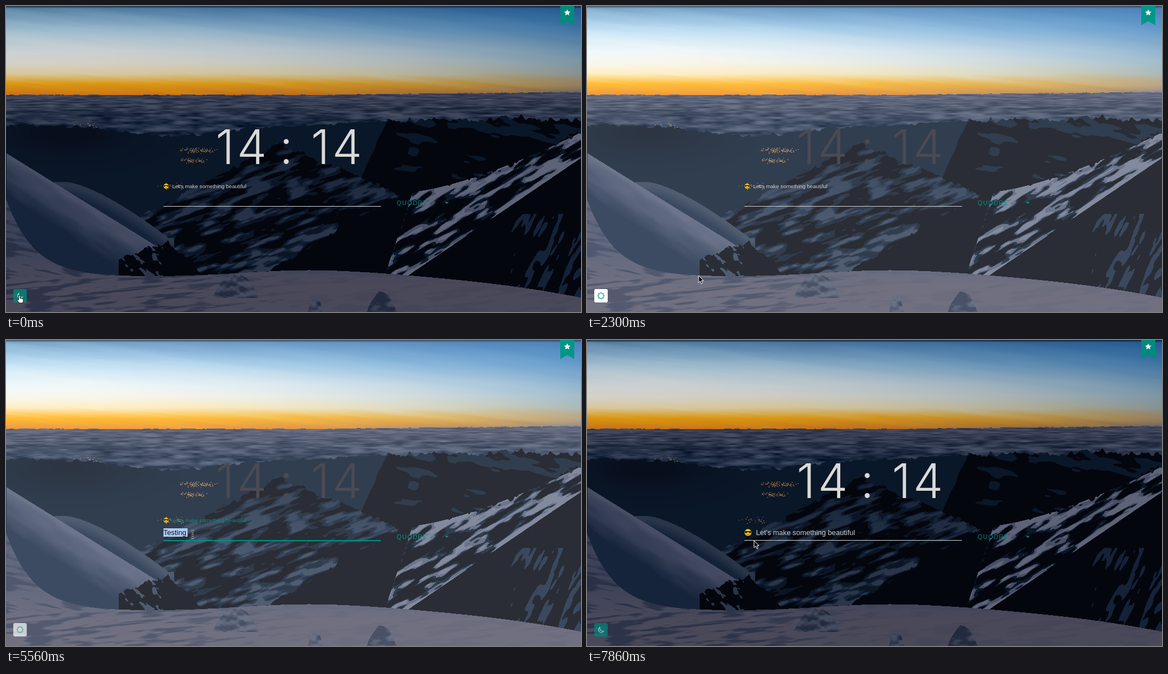
Write an HTML page with a canvas that moves like this. It is 1026 px wide and 546 px high and loops after 8 s.

```html
<!DOCTYPE html>
<html lang="en">
<head>
<meta charset="utf-8">
<title>Start page</title>
<style>
html, body { margin: 0; width: 100%; height: 100%; overflow: hidden; background: #04060e; }
canvas { display: block; }
</style>
</head>
<body>
<canvas id="stage" width="1026" height="546"></canvas>
<script>
const W = 1026, H = 546, LOOP = 8000, HORIZON = 158;
const DAY = 780, NIGHT = 7350, TYPE_END = 4660, CLEAR = 5860;
const stage = document.getElementById('stage').getContext('2d');
const SANS = '"Liberation Sans", Arial, sans-serif';

const clamp = v => Math.min(1, Math.max(0, v));
const ramp = (v, from, to) => clamp((v - from) / (to - from));
const rgb = hex => [1, 3, 5].map(i => parseInt(hex.substr(i, 2), 16));
const mix = (a, b, k) => a.map((v, i) => v + (b[i] - v) * k);
const css = color => `rgb(${color.map(Math.round)})`;
const TEAL = rgb('#009285'), WHITE = rgb('#ffffff'), PALE = rgb('#d0d1d4');

// ---------- landscape: layers of ridge lines with noise textures ----------

function hash(x, y) {
  const s = Math.sin(x * 127.1 + y * 311.7) * 43758.5453;
  return s - Math.floor(s);
}

function noise(x, y) {
  const ix = Math.floor(x), iy = Math.floor(y);
  const fx = (x - ix) ** 2 * (3 - 2 * (x - ix)), fy = (y - iy) ** 2 * (3 - 2 * (y - iy));
  const row = j => hash(ix, j) + (hash(ix + 1, j) - hash(ix, j)) * fx;
  return row(iy) + (row(iy + 1) - row(iy)) * fy;
}

const fbm = (x, y) => (noise(x, y) * 2 + noise(x * 2.3 + 9, y * 2.3)) / 3;
const jag = (x, size) => (fbm(x / 9, 3) - .5) * size;
const bump = (x, center, width) => Math.exp(-(((x - center) / width) ** 2));
const within = (x, from, to, y) => x > from && x < to ? y : Infinity;

// Noise stretched along a direction.
function streak(x, y, angle, length, width) {
  const c = Math.cos(angle), s = Math.sin(angle);
  return fbm((x * c + y * s) / length, (y * c - x * s) / width);
}

const SKY_LEFT = ['#567f9f', '#7a9fbb', '#9dbacd', '#b8c9d1', '#cbd1d2', '#d3d0c6', '#d8c79c', '#da960f', '#c8701a'].map(rgb);
const SKY_RIGHT = ['#23588f', '#2f669b', '#3d73a3', '#537fa4', '#6a8ea8', '#7b95a4', '#87918f', '#95805f', '#5f5a62'].map(rgb);
const BLACK = rgb('#04060e'), NAVY = rgb('#0a1728'), BLUE = rgb('#142238'), SLATE = rgb('#2a3549'),
  SNOW = rgb('#474e64'), BRIGHT = rgb('#5e6377'), DUSK = rgb('#4a495a');

function sky(x, y) {
  const v = clamp((y + (streak(x, y, .12, 180, 9) - .5) * 9) / 160) * 7.999;
  const i = Math.floor(v), tone = stops => mix(stops[i], stops[i + 1], v - i);
  const color = mix(tone(SKY_LEFT), tone(SKY_RIGHT), (x / W) ** (1 + y / 80));
  return mix(color, BLACK, .6 * (1 - ramp(y, 0, 4)));
}

function clouds(x, y) {
  const base = mix(rgb('#3b4156'), rgb('#1d2a40'), ramp(y, HORIZON, 222));
  return mix(base, rgb('#6d7488'), (streak(x, y, 0, 26, 3 + (y - HORIZON) / 12) - .5) * 1.1);
}

function middleMountain(x, y) {
  const n = streak(x, y, -.35, 34, 8);
  return n < .46 ? BLACK : n < .6 ? rgb('#0b1525') : n < .68 ? BLUE : mix(BLUE, SLATE, ramp(y, 250, 400));
}

function rightFace(x, y) {
  const upper = x < 725 ? 331 + (725 - x) * 3 : 331 - 106 * ((x - 725) / 301) ** 1.4;
  const lower = 458 - (x - 750) * .68;
  const n = streak(x, y, -.55, 38, 8);
  if (y > upper && y < lower) {
    const edge = Math.min(y - upper, (lower - y) * .8);
    const light = n + .16 * bump(edge, 0, 16) - .03;
    return light < .47 ? BLACK : light < .56 ? NAVY : light < .66 ? SNOW : BRIGHT;
  }
  return x > 900 && y > 370 && streak(x, y, -1.1, 40, 9) > .62 ? BLUE : BLACK;
}

function foreground(x, y) {
  const base = mix(rgb('#3c4258'), DUSK, ramp(y, 430, 500));
  const shade = ramp(streak(x, y, x < 250 && y < 485 ? .2 : -.1, 42, 5), .52, .68);
  return mix(base, rgb('#1f283f'), shade * (.12 + .55 * (1 - ramp(x, 300, 520))));
}

const boulder = (center, half, top, foot) => ({
  top: x => within(x, center - half, center + half, top + ((x - center) / half) ** 2 * (foot - top) + jag(x, 8)),
  foot,
  color: (x, y) => mix(rgb('#222a3e'), rgb('#454b5f'), ramp(fbm(x / 14, y / 9), .35, .7))
});

// Far to near; each covers everything below its top line.
const LAYERS = [
  { top: () => 0, color: sky },
  { top: x => HORIZON - 5 * ramp(x, 560, 1000) + jag(x, 2), color: clouds },
  { top: x => 213 + 18 * bump(x, 300, 110) - 9 * bump(x, 720, 120) + jag(x, 9),
    color: (x, y) => mix(NAVY, rgb('#070e1c'), bump(x, 110, 120) * bump(y, 225, 45)) },
  { top: x => 203 + Math.max(0, 680 - x) * 2.2 - 7 * bump(x, 905, 40) + jag(x, 14),
    color: (x, y) => streak(x, y, .2, 45, 14) > .56 + ramp(y, 220, 330) * .3 ? NAVY : BLACK },
  { top: x => within(x, 235, 760, 243 + Math.abs(x - 485) * (x < 485 ? .54 : .43) + jag(x, 14)), color: middleMountain },
  { top: x => x > 460 ? Math.max(330 - 106 * ramp(x, 725, W) ** 1.4, 476 - (x - 460) * .58) + jag(x, 16) : Infinity, color: rightFace },
  { top: x => within(x, 85, 300, 314 + 100 * ramp(x, 110, 290) ** 1.4),
    color: (x, y) => mix(SLATE, BLUE, ramp(y - 314 - 100 * ramp(x, 110, 290) ** 1.4, 6, 26)) },
  { top: x => within(x, 0, 292, 262 + x * .62),
    color: (x, y) => mix(SNOW, rgb('#16243b'), ramp(y - 262 - x * .62 + (streak(x, y, .6, 80, 16) - .5) * 34, 8, 72)) },
  { top: x => within(x, 200, 355, 420 + Math.abs(x - 288) * (x < 288 ? .32 : .88) + jag(x, 14)),
    color: (x, y) => streak(x, y, .7, 14, 6) > .62 && x < 280 ? SLATE : BLACK },
  { top: x => 483 - 12 * bump(x, 540, 170) + 37 * ramp(x, 650, W) ** 2 - 138 * Math.exp(-x / 50), color: foreground },
  boulder(410, 42, 478, 520), boulder(670, 27, 510, H), boulder(552, 14, 516, H)
];

function makeCanvas() {
  const canvas = document.createElement('canvas');
  canvas.width = W;
  canvas.height = H;
  return canvas;
}

function drawLights(c, count, x, y, w, h) {
  for (let i = 0; i < count; i++) {
    c.fillStyle = hash(i, y) < .6 ? '#c98a4c' : '#7d5a40';
    c.fillRect(x + (hash(i, 1) + hash(i, 2) - 1) * w, y + (hash(i, 3) + hash(i, 4) - 1) * h, 1.4, 1.2);
  }
}

function nightView() {
  const canvas = makeCanvas(), c = canvas.getContext('2d'), image = c.createImageData(W, H);
  for (let x = 0; x < W; x++) {
    const tops = LAYERS.map(layer => layer.top(x));
    for (let y = 0; y < H; y++) {
      let i = LAYERS.length - 1;
      while (tops[i] > y || LAYERS[i].foot < y) i--;
      image.data.set([...LAYERS[i].color(x, y), 255], (y * W + x) * 4);
    }
  }
  c.putImageData(image, 0, 0);
  drawLights(c, 85, 342, 257, 36, 6);
  drawLights(c, 55, 334, 275, 25, 6);
  drawLights(c, 25, 295, 321, 28, 9);
  drawLights(c, 10, 135, 213, 34, 6);
  return canvas;
}

function dayView(base) {
  const canvas = makeCanvas(), c = canvas.getContext('2d');
  c.drawImage(base, 0, 0);
  c.globalCompositeOperation = 'lighter';
  c.fillStyle = '#262727';
  c.fillRect(0, 0, W, H);
  return canvas;
}

const night = nightView(), day = dayView(night);

// ---------- interface ----------

function text(str, x, y, font, color) {
  stage.font = font;
  stage.fillStyle = color;
  stage.fillText(str, x, y);
}

function fillPath(d, color) {
  stage.fillStyle = color;
  stage.fill(new Path2D(d));
}

// Closed zigzag between two radii: a star or a toothed ring.
function spikes(x, y, count, outer, inner) {
  stage.beginPath();
  for (let i = 0; i < count * 2; i++) {
    const a = i * Math.PI / count - Math.PI / 2, r = i % 2 ? inner : outer;
    stage.lineTo(x + r * Math.cos(a), y + r * Math.sin(a));
  }
  stage.closePath();
}

function drawRibbon(light) {
  fillPath('M989 0H1014V34L1001.500 27L989 34Z', light ? '#009688' : '#008a7e');
  spikes(1001.5, 12, 5, 6, 2.8);
  stage.fillStyle = '#fff';
  stage.fill();
}

function drawClock(light) {
  const font = '300 85px Inter, Roboto, sans-serif', color = light ? '#4b4a53' : '#d9d9d7';
  const endAt = (glyph, right) => {
    stage.font = font;
    text(glyph, right - stage.measureText(glyph).actualBoundingBoxRight, 282, font, color);
  };
  for (const shift of [0, 170]) {
    endAt('1', 400 + shift);
    endAt('4', 461 + shift);
  }
  endAt(':', 505);
}

function drawLabel(drop, focus) {
  const s = .75 + .25 * drop, y = 325 + 23 * drop;
  stage.save();
  stage.translate(281 + 6.3 * s, y - 4.6 * s);
  stage.scale(s, s);
  stage.fillStyle = '#f6c61d';
  stage.beginPath();
  stage.arc(0, 0, 6.1, 0, 7);
  stage.fill();
  fillPath('M-6 -2.500H6L5 .8Q3 2.200 .9 -.6H-.9Q-3 2.200 -5 .8Z', '#1c1a18');
  stage.strokeStyle = '#7a4a10';
  stage.lineWidth = 1;
  stage.stroke(new Path2D('M-2.500 3Q0 4.600 2.500 3'));
  stage.restore();
  text("Let's make something beautiful", 281 + 20.6 * s, y, `${12.85 * s}px ${SANS}`, css(mix(PALE, TEAL, focus)));
}

function drawField(t, light) {
  const settle = ramp(t, NIGHT, NIGHT + 300);
  const focus = t < NIGHT ? ramp(t, 3600, 3780) : .6 * (1 - settle);
  drawLabel(t < NIGHT ? 0 : .5 + .5 * settle, focus);

  stage.fillStyle = light ? css(mix(PALE, TEAL, focus)) : '#d4d5d8';
  stage.fillRect(281, 357, 388, light && focus ? 2 : 1);

  const typed = t < CLEAR ? 'Testing'.slice(0, Math.ceil(7 * ramp(t, 4060, TYPE_END))) : '';
  const selected = t >= 5560 && t < CLEAR;
  if (selected) {
    stage.fillStyle = '#b0cdf0';
    stage.fillRect(281, 336, 43, 15);
  }
  text(typed, 281, 348, `12.85px ${SANS}`, '#11161f');

  // the blink restarts with every edit
  const edited = t < 4100 ? 3630 : t < CLEAR ? Math.min(t, TYPE_END) : CLEAR;
  if (t >= 3630 && t < NIGHT && !selected && (t - edited) % 900 < 430) {
    stage.fillStyle = '#0c1017';
    stage.fillRect(281 + (typed && Math.round(stage.measureText(typed).width) + 1), 336, 1, 15);
  }
}

function drawSelect(light) {
  const color = light ? '#0a9186' : '#0a857c';
  stage.letterSpacing = '1.2px';
  text('QUODRE', 697, 355, `11px ${SANS}`, color);
  stage.letterSpacing = '0px';
  fillPath('M783 349.500H790L786.500 353Z', color);
}

function drawButton(t, light) {
  const white = light ? .85 + .15 * ramp(t, DAY, DAY + 150) : t < DAY ? 0 : .65 * (1 - ramp(t, NIGHT, NIGHT + 300));
  const hover = ramp(t, -150, 330) - ramp(t, 2300, 2600) + ramp(t, 6460, 6760) - ramp(t, 7450, 7750);
  stage.globalAlpha = .7 + .3 * hover;
  stage.fillStyle = css(mix(rgb('#00897c'), WHITE, white));
  stage.beginPath();
  stage.roundRect(13, 505, 24, 24, 3);
  stage.fill();
  stage.lineWidth = 1.1;
  stage.strokeStyle = light ? css(TEAL) : css(mix(rgb('#d5ebe8'), rgb('#7fd0c6'), white));
  if (light) {
    spikes(25, 517, 8, 5.8, 4.3);
    stage.stroke();
  } else {
    stage.stroke(new Path2D('M23 512.500A5 5 0 1 0 29.800 519.300A5.400 5.400 0 0 1 23 512.500Z'));
  }
  stage.globalAlpha = 1;
}

// ---------- pointer ----------

const POINTERS = {
  arrow: ['M0 0V12.500L2.900 9.800L5 14.500L7.200 13.500L5.200 9H9Z', '#0a0a0a', '#fff'],
  hand: ['M-1.500 1Q0 -.8 1.200 1V6Q2.500 4.800 3.500 6Q5 5.200 5.500 6.800Q7 6.200 7 8V11L5.500 14H-.5L-4.500 8.800Q-4.500 7 -1.500 8.700Z', '#fff', '#111'],
  beam: ['M-3 -7Q0 -7 0 -5Q0 -7 3 -7M0 -5V5M-3 7Q0 7 0 5Q0 7 3 7M-2 1.500H2', 'transparent', '#11151c']
};

function glide(t, from, to, start, duration) {
  const k = clamp(Math.floor((t - start) / 150) * 150 / duration);
  return mix(from, to, k * (2 - k));
}

function pointerAt(t) {
  if (t < 2300) return [24, 516];
  if (t < 6160) return glide(t, [199, 481], [333, 347], 2300, 750);
  if (t < NIGHT) return glide(t, [190, 412], [28, 517], 6160, 600);
  return glide(t, [28, 517], [298, 358], NIGHT, 450);
}

function drawPointer(t) {
  const [x, y] = pointerAt(t);
  const kind = x < 37 && y > 504 ? 'hand' : y < 356 ? 'beam' : 'arrow';
  const [d, fill, line] = POINTERS[kind], path = new Path2D(d);
  const outline = (color, width) => {
    stage.strokeStyle = color;
    stage.lineWidth = width;
    stage.stroke(path);
  };
  stage.save();
  stage.translate(x, y);
  stage.lineJoin = 'round';
  if (kind === 'beam') outline('rgba(225,228,235,.8)', 2.4);
  stage.fillStyle = fill;
  stage.fill(path);
  outline(line, 1);
  stage.restore();
}

function draw() {
  const t = performance.now() % LOOP, light = t >= DAY && t < NIGHT;
  stage.drawImage(light ? day : night, 0, 0);
  drawRibbon(light);
  drawClock(light);
  drawField(t, light);
  drawSelect(light);
  drawButton(t, light);
  drawPointer(t);
  requestAnimationFrame(draw);
}
draw();
</script>
</body>
</html>
```
